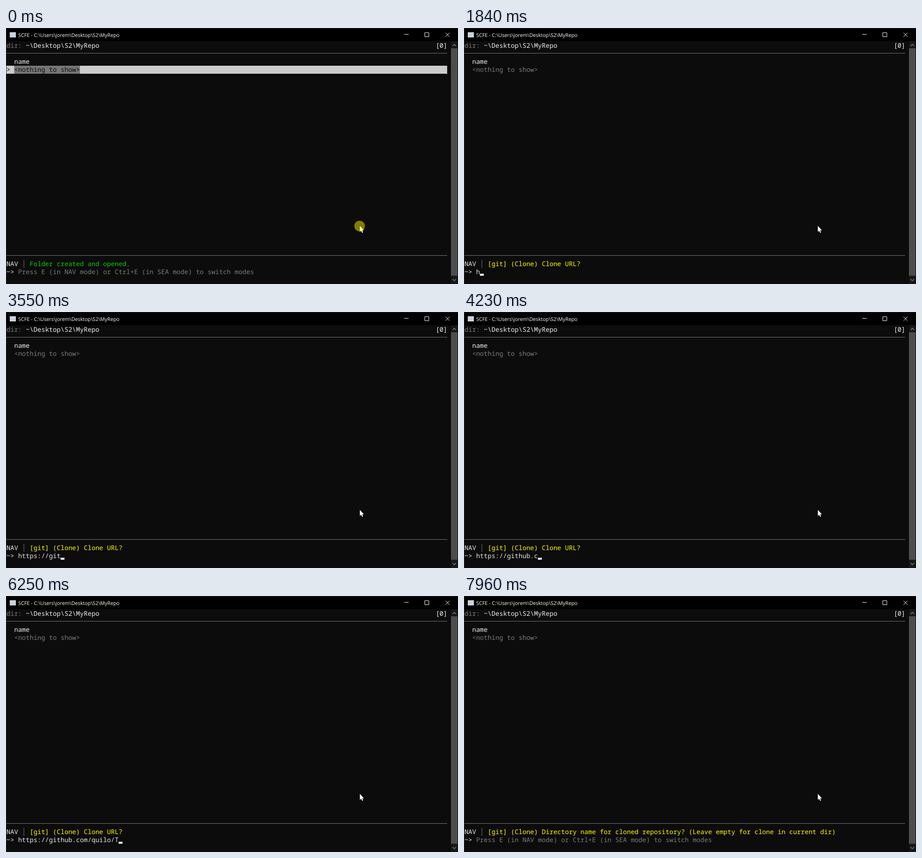
Recreate the animation shown at these times as an HTML page. Size 960 by 543 pixels, loop 8 s.

```html
<!DOCTYPE html>
<html lang="en">
<head>
<meta charset="utf-8">
<title>Terminal file explorer</title>
<style>
  html, body { margin: 0; width: 100%; height: 100%; overflow: hidden; background: #0c0c0c; }
  svg { display: block; width: 960px; height: 543px; }
  text {
    font: 500 13.69px "Noto Sans Mono", "DejaVu Sans Mono", monospace;
    text-rendering: geometricPrecision;
    white-space: pre;
    fill: #e6e6e6;
  }
  .title { font: 10.75px "Open Sans", "Noto Sans", sans-serif; fill: #fff; }
  .bright { fill: #f2f2f2; }
  .dim { fill: #7c7c7c; }
  .dark { fill: #0c0c0c; }
  .ok { fill: #16c60c; }
  .ask { fill: #ff0; }
  .rule { stroke: #767676; }
  .button { fill: none; stroke: #fff; }
  .chevron { fill: none; stroke: #8a8a8a; stroke-width: 1.3; }
</style>
</head>
<body>
<svg viewBox="0 0 960 543">
  <rect width="960" height="543" fill="#0c0c0c"/>

  <!-- title bar -->
  <rect width="960" height="28" fill="#000"/>
  <rect width="960" height="1" fill="#1e1e1e"/>
  <rect width="1" height="543" fill="#262626"/>
  <rect x="8" y="9" width="13" height="11" fill="#c9d3dc"/>
  <text class="title" x="26" y="18.6">SCFE - C:\Users\jorem\Desktop\S2\MyRepo</text>
  <path class="button" d="M846 13.5h9M889.5 9.9h8.5v8.6h-8.5z"/>
  <path class="button" d="M933.5 10l8.5 8.5M942 10l-8.5 8.5"/>

  <!-- scrollbar -->
  <rect x="945" y="28" width="14" height="515" fill="#171717"/>
  <rect x="945" y="43" width="14" height="482.5" fill="#4d4d4d"/>
  <path class="chevron" d="M948.5 38.2l3.7-3.7 3.7 3.7M948.5 532.5l3.7 3.7 3.7-3.7"/>

  <!-- listing -->
  <text class="dim" data-cell="0 0">dir:</text>
  <text class="bright" data-cell="5 0">~\Desktop\S2\MyRepo</text>
  <text class="bright" data-cell="111 0">[0]</text>
  <path class="rule" d="M1 53.5h936M1 482.5h936"/>
  <text class="bright" data-cell="2 2">name</text>
  <g id="selected">
    <rect x="1" y="80" width="936" height="17" fill="#ccc"/>
    <rect x="17.4" y="80" width="139.6" height="17" fill="#767676"/>
    <text class="dark" data-cell="0 3">&gt;</text>
    <text class="dark" data-cell="2 3">&lt;nothing to show&gt;</text>
  </g>
  <text id="plain" class="dim" data-cell="2 3">&lt;nothing to show&gt;</text>

  <!-- status and prompt -->
  <text data-cell="0 27">NAV</text>
  <path class="rule" d="M38 491.7v17"/>
  <text id="status" data-cell="6 27"></text>
  <text class="bright" data-cell="0 28">~&gt;</text>
  <text id="input" data-cell="3 28"></text>
  <rect id="caret" y="521.3" width="8.2" height="4.1" fill="#fff"/>

  <!-- pointer -->
  <path d="M751.6 419.8v12.8l2.8-2.6 2 4.4 2-.9-2-4.3h3.8z" fill="#fff"/>
  <circle id="click" cx="751" cy="420" r="11.2" fill="#ff0" fill-opacity=".47"/>
</svg>
<script>
  const LOOP = 8000, ASK = 850, ENTER = 7650;
  const CELL_W = 8.213, CELL_H = 17.15, LEFT = 1, BASELINE = 41.9;
  const HINT = 'Press E (in NAV mode) or Ctrl+E (in SEA mode) to switch modes';

  const keys = [
    [1760, 'h'], [1910, 't'], [1990, 't'], [2060, 'p'], [2140, 's'], [2380, ':'],
    [2610, '/'], [2760, '/'],
    [3450, 'g'], [3550, 'it'], [3710, 'h'], [3790, 'u'], [3870, 'b'],
    [4020, '.'], [4180, 'c'], [4290, 'o'], [4400, 'm'],
    [4630, '/'], [4840, 'q'], [4940, 'u'], [5080, 'i'], [5160, 'l'], [5240, 'o'],
    [5620, '/'], [6250, 'T'], [6330, 'e'], [6560, 'st'],
    [6860, 'R'], [6960, 'e'], [7060, 'p'], [7160, 'o']
  ];
  const caretOff = [
    [0, ASK], [1080, 1610], [3150, 3450], [4790, 4840],
    [5310, 5620], [5850, 6250], [7440, ENTER], [7960, LOOP]
  ];

  const el = id => document.getElementById(id);
  const [selected, plain, status, input, caret, click] =
    ['selected', 'plain', 'status', 'input', 'caret', 'click'].map(el);
  const show = (node, on) => node.setAttribute('visibility', on ? 'visible' : 'hidden');
  const columnX = col => LEFT + col * CELL_W;
  const write = (node, text, style) => {
    if (node.textContent !== text) node.textContent = text;
    node.setAttribute('class', style);
  };

  for (const node of document.querySelectorAll('[data-cell]')) {
    const [col, row] = node.dataset.cell.split(' ').map(Number);
    node.setAttribute('x', columnX(col));
    node.setAttribute('y', BASELINE + row * CELL_H);
  }

  function draw(t) {
    const asking = t >= ASK;
    const typed = t >= ENTER ? '' :
      keys.filter(([at]) => at <= t).map(([, chars]) => chars).join('');

    show(click, t < 90);
    show(selected, !asking);
    show(plain, asking);

    if (!asking) write(status, 'Folder created and opened.', 'ok');
    else if (t < ENTER) write(status, '[git] (Clone) Clone URL?', 'ask');
    else write(status, '[git] (Clone) Directory name for cloned repository? (Leave empty for clone in current dir)', 'ask');

    write(input, typed || HINT, typed ? '' : 'dim');
    caret.setAttribute('x', columnX(3 + typed.length));
    show(caret, !caretOff.some(([from, to]) => t >= from && t < to));
  }

  const start = performance.now();
  function tick() {
    draw((performance.now() - start) % LOOP);
    requestAnimationFrame(tick);
  }
  tick();
</script>
</body>
</html>
```
